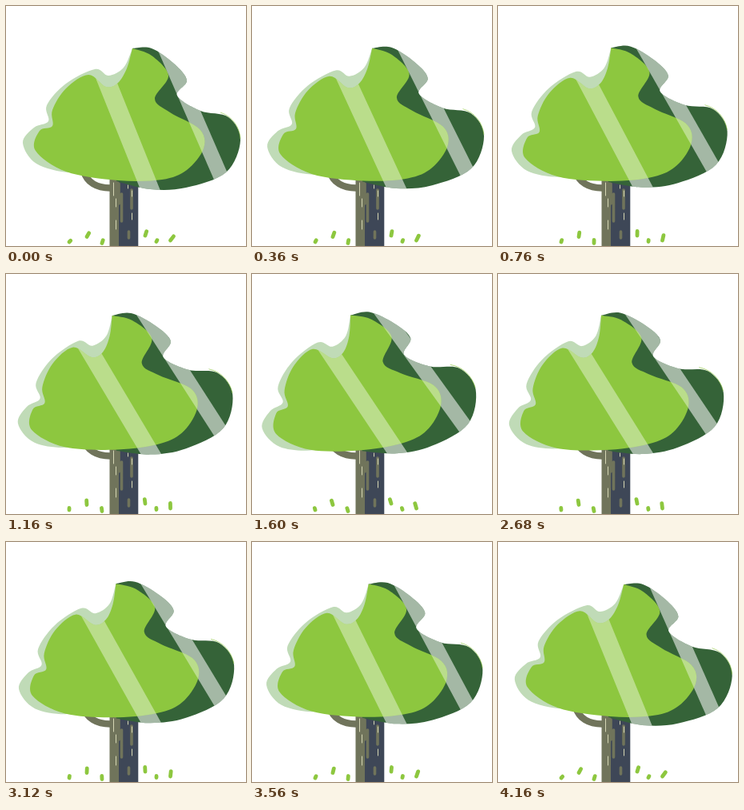
These frames come from a looping animation (300x300 px, 4.2 s). An HTML page:

```html
<!DOCTYPE html>
<html lang="en">
<head>
<meta charset="utf-8">
<title>Swaying tree</title>
<style>
html, body { margin: 0; width: 100%; height: 100%; overflow: hidden; background: #fff; }
svg { display: block; width: 100vw; height: 100vh; }
.pale { fill: #c0dbb7; }
.dark { fill: #356338; }
.light { fill: #8dc73f; }
</style>
</head>
<body>
<svg viewBox="0 0 300 300">
  <defs>
    <clipPath id="inDark"><path class="sway dark"/></clipPath>
    <clipPath id="inLight"><path class="sway light"/></clipPath>
    <g id="bands" fill="#fff"><path/><path/></g>
  </defs>

  <path d="M97 206C101 220 113 228 132 227.5" fill="none" stroke="#70745b" stroke-width="8.5"/>
  <path d="M129.500 205h12v95h-12z" fill="#70745b"/>
  <path d="M141 205h24.300v95h-24.300z" fill="#3e4757"/>
  <g fill="none" stroke-linecap="round">
    <path d="M144.5 235v34M157 230v23M153.5 282v8M141 222v25" stroke="#70745b" stroke-width="3.6"/>
    <path d="M134.5 221v16M137.5 241v10M152.5 224v4M157.5 231v7M157.5 259v8M137.5 268v11" stroke="#d5d6b4"/>
  </g>

  <g id="grass" stroke="#8dc73f" stroke-width="4.8" stroke-linecap="round"></g>

  <path class="sway dark"/>
  <path class="sway" d="M268 133C283 138 292 151 293 166" fill="none" stroke="#8dc73f" stroke-width=".6"/>
  <use href="#bands" clip-path="url(#inDark)" opacity=".55"/>
  <path class="sway pale"/>
  <path class="sway light"/>
  <use href="#bands" clip-path="url(#inLight)" opacity=".4"/>
</svg>
<script>
const LOOP = 4200, TURN = 1960, STEP = 40;
const all = s => document.querySelectorAll(s);

// Smooth closed outline that starts at the sharp tip of the crown
function outline(...keys) {
  const pts = [[158, 53], ...keys];
  const at = i => pts[Math.max(0, Math.min(pts.length - 1, i))];
  const lean = (i, k) => (at(i + 1)[k] - at(i - 1)[k]) / 6;
  let d = "M" + pts[0];
  for (let i = 1; i < pts.length; i++) {
    const out = pts[i - 1].map((v, k) => v + lean(i - 1, k));
    const into = pts[i].map((v, k) => v - lean(i, k));
    d += `C${out} ${into} ${pts[i]}`;
  }
  return d + "Z";
}

const shapes = {
  pale: outline([147, 77], [128, 87], [111, 79], [75, 97], [51, 124], [53, 144],
    [35, 152], [21, 171], [38, 197], [80, 208], [120, 200], [165, 140]),
  dark: outline([182, 53], [210, 72], [226, 93], [214, 112], [243, 131], [278, 139],
    [293, 168], [275, 208], [225, 227], [180, 229], [138, 219]),
  light: outline([182, 62], [203, 87], [186, 116], [205, 133], [242, 154], [247, 178],
    [226, 205], [195, 217], [140, 218], [75, 207], [37, 181], [42, 156], [58, 150],
    [58, 130], [75, 103], [103, 86], [125, 101], [140, 96], [151, 78], [158, 53])
};
for (const name in shapes)
  all("." + name).forEach(el => el.setAttribute("d", shapes[name]));

// Blades: base x, base y, length; they lean more the farther they are from the trunk
const blades = [[79, 295, 2.5], [101, 288.5, 5.5], [120, 296.5, 4],
  [174, 287, 5.5], [188, 294.5, 2], [205.5, 293, 6.5]];
grass.innerHTML = blades.map(([x, y, len]) => `<path d="M${x} ${y}v${-len}"/>`).join("");

// A slanted band given by its left edge at y = 80 and y = 230
function band(el, top, bottom, width) {
  const k = (bottom - top) / 150, x0 = top - 80 * k, x1 = x0 + 300 * k;
  el.setAttribute("d", `M${x0} 0h${width}L${x1 + width} 300h${-width}Z`);
}

function draw(now) {
  const t = Math.floor(now % LOOP / STEP) * STEP;
  const p = t < TURN ? t / TURN : (LOOP - t) / (LOOP - TURN);
  const lean = [1 - .02 * p, -.205 * p, .252 * p, 1 + .003 * p, 0, 0];
  const sway = `translate(152 222) matrix(${lean}) translate(-152 -222)`;
  all(".sway").forEach(el => el.setAttribute("transform", sway));
  const [a, b] = bands.children;
  band(a, 108 - 43.5 * p, 168.2 + 5.5 * p, 24.5 + 2 * p);
  band(b, 200.5 - 32 * p, 265.6 + 21 * p, 20.5 + 3.5 * p);
  blades.forEach(([x, y], i) => {
    const far = Math.abs(x - 147), angle = .65 * far - (22 + .75 * far) * p;
    grass.children[i].setAttribute("transform", `rotate(${angle} ${x} ${y})`);
  });
}

const start = performance.now();
function tick() {
  draw(performance.now() - start);
  requestAnimationFrame(tick);
}
tick();
</script>
</body>
</html>
```
